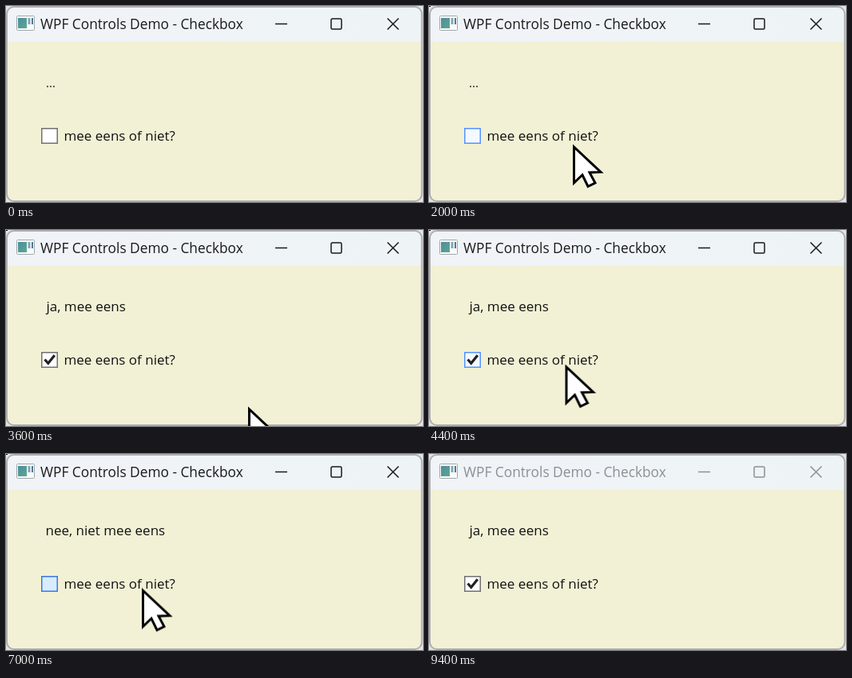
An HTML page that plays this animation: 522x246 px, repeating every 9.6 s.

```html
<!DOCTYPE html>
<html lang="nl">
<head>
<meta charset="utf-8">
<title>Checkbox demo</title>
<style>
  html, body { margin: 0; width: 100%; height: 100%; overflow: hidden; background: #e4e4e6; }
  svg { display: block; width: 522px; height: 246px; }
  text { font-family: "Open Sans", "Noto Sans", sans-serif; font-size: 17px; fill: #111; }
  .title { font-size: 17.3px; fill: currentColor; }
  .dots { font-size: 15px; }

  /* Every change is a hard step on a shared 9.6 s loop. */
  .bar, .dot, .box, .tick, .dots, .yes, .no, .up, .arrow {
    animation: 9.6s step-end infinite;
  }
  .bar { animation-name: bar; color: #1a1a1a; }
  .dot { animation-name: dot; }
  .box { animation-name: box; stroke-width: 1.5; }
  .tick { animation-name: tick; }
  .dots { animation-name: dots; }
  .yes { animation-name: tick; }
  .no { animation-name: no; }
  .up { animation-name: up; }
  .arrow { animation-name: arrow; }
  .pointer { fill: #fff; stroke: #000; stroke-width: 3; stroke-miterlimit: 6; }

  @keyframes bar { 0% { color: #1a1a1a; } 97.91%, 100% { color: #8b9095; } }
  @keyframes dot { 0% { opacity: 0; } 2.08% { opacity: 1; } 97.91%, 100% { opacity: 0; } }
  @keyframes dots { 0% { opacity: 1; } 29.16%, 100% { opacity: 0; } }
  @keyframes no { 0% { opacity: 0; } 50% { opacity: 1; } 75%, 100% { opacity: 0; } }
  @keyframes tick {
    0% { opacity: 0; }
    29.16% { opacity: 1; }
    50% { opacity: 0; }
    75%, 100% { opacity: 1; }
  }
  /* idle, hovered, pressed */
  @keyframes box {
    0%, 33.33%, 56.25%, 81.25%, 100% { fill: #fff; stroke: #707070; }
    20.83%, 29.16%, 43.75%, 50%, 66.66%, 75% { fill: #f3f9ff; stroke: #5593ff; }
    27.08%, 47.91%, 72.91% { fill: #d9ecff; stroke: #3c77dd; }
  }
  @keyframes up { 0% { opacity: 0; } 14.58% { opacity: 1; } 16.66%, 100% { opacity: 0; } }
  @keyframes arrow {
    0% { transform: translate(243px, 260px); }
    16.66% { transform: translate(243px, 201px); }
    18.75% { transform: translate(212px, 185px); }
    20.83% { transform: translate(180px, 173px); }
    22.91% { transform: translate(163px, 170px); }
    25% { transform: translate(158.5px, 170px); }
    33.33% { transform: translate(178px, 182px); }
    35.41% { transform: translate(250px, 213px); }
    37.5% { transform: translate(303px, 221px); }
    39.58% { transform: translate(268px, 212px); }
    41.66% { transform: translate(205px, 186px); }
    43.75% { transform: translate(174px, 171px); }
    45.83% { transform: translate(170.5px, 168px); }
    56.25% { transform: translate(210px, 196px); }
    58.33% { transform: translate(236.5px, 217.5px); }
    60.41% { transform: translate(236px, 232px); }
    62.5% { transform: translate(215px, 212px); }
    64.58% { transform: translate(186px, 182px); }
    66.66% { transform: translate(172px, 170px); }
    68.75% { transform: translate(170px, 167.5px); }
    81.25% { transform: translate(155px, 220px); }
    83.33%, 100% { transform: translate(150px, 260px); }
  }
</style>
</head>
<body>
<svg viewBox="0 0 522 246">
  <defs>
    <clipPath id="frame"><rect x="1" y="1" width="519.5" height="244" rx="9"/></clipPath>
    <linearGradient id="caption" x2="1" y2="0">
      <stop offset="0" stop-color="#f0f3f8"/>
      <stop offset="1" stop-color="#eef4f6"/>
    </linearGradient>
    <linearGradient id="pane" x2="1" y2="1">
      <stop offset="0" stop-color="#4a8fa0"/>
      <stop offset="1" stop-color="#5fa58e"/>
    </linearGradient>
  </defs>

  <g clip-path="url(#frame)">
    <rect width="522" height="246" fill="#f2f1d5"/>
    <rect width="522" height="45" fill="url(#caption)"/>
  </g>
  <rect x="1" y="1" width="519.5" height="244" rx="9" fill="none" stroke="#aeaeb2" stroke-width="2"/>
  <rect class="dot" width="2" height="1" fill="#000"/>

  <g class="bar">
    <rect x="13.5" y="12.5" width="22" height="18" rx="1" fill="#fafafa" stroke="#a3a7aa"/>
    <rect x="15" y="15" width="11" height="13" fill="url(#pane)"/>
    <rect x="27.5" y="15" width="3" height="8" fill="#7fa9b8"/>
    <rect x="32" y="15" width="2" height="8" fill="#55788c"/>
    <text class="title" x="43" y="29">WPF Controls Demo - Checkbox</text>
    <g fill="none" stroke="currentColor" stroke-width="1.5">
      <path d="M337 22.5H352"/>
      <rect x="407" y="16" width="13" height="13" rx="1.5"/>
      <path d="M477.5 15.5L491.5 29.5M491.5 15.5L477.5 29.5"/>
    </g>
  </g>

  <text class="dots" x="50" y="102">...</text>
  <text class="yes" x="50.5" y="102">ja, mee eens</text>
  <text class="no" x="49.5" y="102">nee, niet mee eens</text>

  <rect class="box" x="44.75" y="153.75" width="19.5" height="18.5"/>
  <path class="tick" d="M48.5 162.5L52.8 167.3L60.8 157.3" fill="none" stroke="#212121" stroke-width="3.2"/>
  <text x="72.5" y="169">mee eens of niet?</text>

  <path class="pointer up" d="M273 212.5L286 226.5H278V260H268V226.5H260Z"/>
  <path class="pointer arrow" d="M1.5 4V49L12 39L19 53.5L28 49L21 36L35 35.5Z"/>
</svg>
</body>
</html>
```
